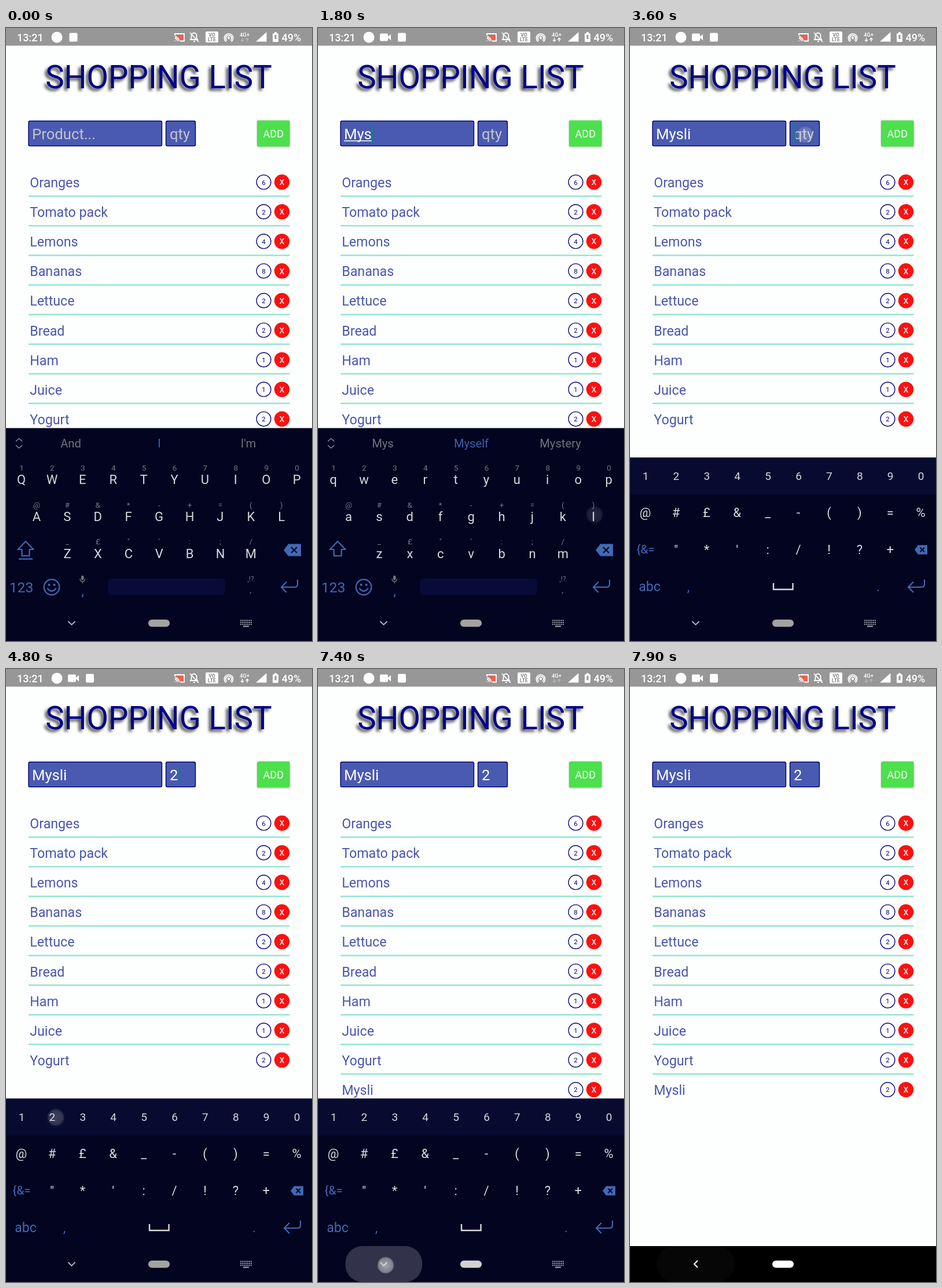
Recreate the animation shown at these times as an HTML page. Size 529x1058 px, loop 8 s.

```html
<!DOCTYPE html>
<html lang="en">
<head>
<meta charset="utf-8">
<title>Shopping list</title>
<style>
  html, body { margin: 0; width: 100%; height: 100%; overflow: hidden; background: #fdfffe; }
  svg { display: block; width: 100%; height: 100%; font-family: Roboto, sans-serif; }
  text { white-space: pre; }
  .mid { text-anchor: middle; }
  .title { font-size: 54.6px; fill: #00008b; filter: drop-shadow(-4px 4px 2.5px rgba(0, 0, 0, .75)); }
  .field { fill: #4a5ab0; stroke: #00007c; stroke-width: 1.4; }
  .input { font-size: 25.7px; }
  .add { fill: #4ce04c; filter: drop-shadow(0 1.5px 1.5px rgba(0, 0, 0, .3)); }
  .item { font-size: 23.2px; fill: #4a55ae; }
  .count { font-size: 11.5px; fill: #00007c; }
  .key { font-size: 22px; fill: #d9d9de; }
  .hint { font-size: 13.5px; fill: #77777f; }
  .blue { fill: #4169b5; }
  .line { fill: none; stroke: #4169b5; stroke-width: 2.2; }
  .status { font-size: 18px; font-weight: 500; fill: #fff; }
</style>
</head>
<body>
<svg id="stage" viewBox="0 0 529 1058"></svg>
<script>
const LOOP = 8000;
const COL = 52.9, ROW = 51.1;
const items = [['Oranges', 6], ['Tomato pack', 2], ['Lemons', 4], ['Bananas', 8], ['Lettuce', 2],
  ['Bread', 2], ['Ham', 1], ['Juice', 1], ['Yogurt', 2], ['Mysli', 2]];

// Timeline, in ms
const typed = [[0, ''], [880, 'M'], [1300, 'My'], [1600, 'Mys'], [1850, 'Mysl'], [2080, 'Mysli'], [2330, 'Mysli ']];
const suggestions = {
  '': ['And', 'I', "I'm"],
  'M': ['Muchas', 'Me', 'Me gustaría'],
  'My': ['Mi', 'My', 'Myself'],
  'Mys': ['Mys', 'Myself', 'Mystery'],
  'Mysl': ['Mysl', 'Myself', 'Mysli'],
  'Mysli': ['Myself', 'Mysli', 'Muslim'],
  'Mysli ': ['de', 'and', 'is']
};
const QTY_FOCUS = 3500, KEYS_SWAP = 3600, QTY_TYPED = 4730, ITEM_ADDED = 6200;
const HIDE_START = 7500, HIDE_END = 7750;
const blinkStarts = [-700, ...typed.slice(1).map(step => step[0]), QTY_FOCUS, QTY_TYPED];
const taps = [
  [850, 1150, 428, 899], [1230, 1450, 293, 777], [1530, 1750, 109, 841], [1780, 1990, 478, 840],
  [2010, 2220, 399, 777], [2270, 2620, 271, 711], [3400, 3650, 303, 184], [4550, 4850, 86, 774],
  [5700, 6100, 459, 182], [7200, 7600, 117, 1029]
];

const label = (x, y, str, cls = '', attrs = '') =>
  `<text x="${x}" y="${y}" class="${cls}" ${attrs}>${str.replace('&', '&amp;')}</text>`;
const rect = (x, y, w, h, fill, r = 0, attrs = '') =>
  `<rect x="${x}" y="${y}" width="${w}" height="${h}" rx="${r}" fill="${fill}" ${attrs}/>`;
const path = (d, attrs = 'class="line"') => `<path d="${d}" ${attrs}/>`;
const whiteLine = 'fill="none" stroke="#fff" stroke-width="1.8"';
const row = (chars, x, y, cls = 'key', attrs = '') =>
  [...chars].map((c, i) => c === ' ' ? '' : label(x + COL * i, y, c, `mid ${cls}`, attrs)).join('');

function statusBar() {
  return rect(0, 0, 529, 30.5, '#979797')
    + label(19, 22.5, '13:21', 'status') + label(476.5, 22.5, '49%', 'status')
    + '<circle cx="88" cy="16" r="9.5" fill="#fff"/>'
    + `<g id="camera">${rect(107, 9.5, 14, 13, '#fff', 2)}${path('M120 16l6-5.5v11z', 'fill="#fff"')}</g>`
    + `<g id="badge">${rect(138, 8.5, 14, 15, '#fff', 2)}</g>`
    + rect(295, 12, 12, 9, '#f0604f')
    + path('M292 13V10h16v12.500h-7M292 22.500v-1M292 18a5 5 0 0 1 4.500 4.500M292 15a8 8 0 0 1 7.500 7.500', whiteLine)
    + path('M319 20h12l-1.500-2.500v-4.500a4.500 4.500 0 0 0-9 0v4.500zM324 23h3M318 8l15 16', whiteLine)
    + rect(345, 6, 22, 19, '#fff', 2)
    + label(356, 14.5, 'VO', 'mid', 'font-size="8.500" font-weight="700" fill="#888"')
    + label(356, 23, 'LTE', 'mid', 'font-size="8.500" font-weight="700" fill="#888"')
    + '<circle cx="385" cy="17" r="2.200" fill="#fff"/>'
    + path('M382 21.500a5 5 0 1 1 6 0M380.500 23.500a7.600 7.600 0 1 1 9 0', whiteLine)
    + label(412.5, 14.5, '4G+', 'mid', 'font-size="9.500" font-weight="500" fill="#fff"')
    + `<g id="traffic">${path('M408.500 17v6m-2.500-2.500l2.500 2.500 2.500-2.500M417 23.500v-6m-2.500 2.500l2.500-2.500 2.500 2.500',
        'fill="none" stroke="#fff" stroke-width="1.500"')}</g>`
    + path('M432 23.500h18.500V7z', 'fill="#fff"')
    + rect(461, 9, 10, 15, '#fff', 1.5) + rect(464, 7, 4, 3, '#fff')
    + rect(464.5, 12, 3, 7, '#979797');
}

function listItem([name, count], i) {
  const y = 266 + ROW * i;
  const separator = i ? rect(39, y - 28.100, 451.5, 2.4, '#8ee4d0') : '';
  return `<g id="item${i}">${separator}${label(41.3, y + 9, name, 'item')}
    <circle cx="445.500" cy="${y}" r="12.400" fill="#fff" stroke="#00007c" stroke-width="1.400"/>
    ${label(445.5, y + 4.5, String(count), 'mid count')}
    <circle cx="477" cy="${y}" r="13.200" fill="#fd1010"/>
    ${label(477, y + 5.2, 'x', 'mid', 'font-size="18" fill="#fff"')}</g>`;
}

function app() {
  return rect(0, 0, 529, 996, '#fdfffe') + statusBar()
    + label(264, 104, 'SHOPPING LIST', 'mid title')
    + '<rect class="field" x="39" y="160.500" width="230.500" height="43" rx="2.500"/>'
    + '<rect class="field" x="276.500" y="160.500" width="51" height="43" rx="2.500"/>'
    + label(45, 192, '', 'input', 'id="product"') + label(283, 192, '', 'input', 'id="qty"')
    + rect(45, 194, 0, 1.5, '#fff', 0, 'id="underline"')
    + rect(0, 166, 2.6, 33, '#0d7f88', 0, 'id="cursor"')
    + '<rect class="add" x="434" y="159.500" width="56.500" height="45" rx="2.500"/>'
    + label(462.3, 189.3, 'ADD', 'mid', 'font-size="18" fill="#fff"')
    + items.map(listItem).join('');
}

function backspace(x, y, w, h) {
  const cx = x + w * .6, cy = y + h / 2, s = h * .23;
  return path(`M${x} ${cy}l${w * .27} ${-h / 2}h${w * .73}v${h}h${-w * .73}z`, 'class="blue"')
    + path(`M${cx - s} ${cy - s}l${2 * s} ${2 * s}m0 ${-2 * s}l${-2 * s} ${2 * s}`,
      'stroke="#020420" stroke-width="2"');
}
const enter = x => path(`M${x + 30} 952v8q0 5-5 5h-23m9-9l-9 9 9 9`);

function letterRows(upper) {
  const fit = s => upper ? s : s.toLowerCase();
  return `<g id="${upper ? 'upper' : 'lower'}">${row(fit('QWERTYUIOP'), 26.5, 787.3)}
    ${row(fit('ASDFGHJKL'), 53, 851.3)}${row(fit('ZXCVBNM'), 106, 915)}
    ${upper ? path('M22 916.500h24') : ''}</g>`;
}

function letterKeys() {
  return '<g id="letters">' + rect(0, 690.5, 529, 368, '#020420')
    + path('M17 713.500l5.500-5 5.500 5M17 720l5.500 5 5.500-5', 'fill="none" stroke="#888a96" stroke-width="1.500"')
    + [112, 265, 419].map((x, i) =>
        label(x, 724, '', 'mid', `id="hint${i}" fill="${i === 1 ? '#3b61ae' : '#70727c'}"`)).join('')
    + row('1234567890', 27, 764, 'hint') + row('@#&*-+=()', 53, 828, 'hint')
    + row('_£"\':;/', 106, 891, 'hint')
    + letterRows(true) + letterRows(false)
    + path('M34 886l13.500 14h-7v11h-13v-11h-7z', 'class="line" stroke-linejoin="round"')
    + backspace(480, 890.5, 30, 21)
    + label(26.5, 974, '123', 'mid blue', 'font-size="24.500"')
    + '<circle class="line" cx="79" cy="965" r="13.300"/>'
    + '<circle class="blue" cx="74.500" cy="961" r="2"/><circle class="blue" cx="83.500" cy="961" r="2"/>'
    + path('M71.500 967q7.500 10 15 0')
    + rect(130, 945, 4.4, 8, '#77777f', 2.2)
    + path('M128 950.500q0 5 4.200 5t4.200-5M132.200 955.500v3', 'fill="none" stroke="#77777f" stroke-width="1.300"')
    + label(132.5, 979.5, ',', 'mid blue', 'font-size="23"')
    + rect(176, 950, 202.5, 29, '#080b38', 6)
    + label(423, 955, ',!?', 'mid hint', 'style="font-size:12px"')
    + label(423, 976, '.', 'mid hint', 'style="font-size:20px"')
    + enter(474) + '</g>';
}

function numberKeys() {
  return '<g id="numbers">' + rect(0, 741.5, 529, 317, '#020420') + rect(0, 741.5, 529, 64, '#080b30')
    + row('1234567890', 27, 779.7, 'key', 'style="font-size:19px"')
    + row('@#£&_-()=%', 26.5, 844) + row('"*\':/!?+', 79.5, 907.5)
    + label(27, 907, '{&=', 'mid blue', 'font-size="21"')
    + backspace(492, 892.5, 22, 16)
    + label(34, 971.5, 'abc', 'mid blue', 'font-size="23"')
    + label(101, 972, ',', 'mid blue', 'font-size="22"')
    + path('M248 958v11h33.500v-11', 'fill="none" stroke="#d9d9de" stroke-width="2.400"')
    + label(429, 971.5, '.', 'mid blue', 'font-size="22"')
    + enter(479) + '</g>';
}

function navigation() {
  const dots = Array.from({ length: 21 }, (_, i) =>
    rect(405 + i % 7 * 3, 1021.5 + Math.floor(i / 7) * 3.4, 1.9, 2, '#a4a4ad')).join('');
  return rect(47.5, 996, 132.5, 62, '#fff', 29, 'id="press"')
    + path('M107.500 1024l6 6 6-6', 'id="hide" fill="none" stroke="#b5b5bd" stroke-width="1.900"')
    + path('M117 1021l-6 6 6 6', 'id="back" fill="none" stroke="#fff" stroke-width="2"')
    + rect(246, 1021, 37, 12.5, '#a2a2a8', 6.25, 'id="pill"')
    + `<g id="dots">${dots}${rect(410, 1031.7, 10, 2, '#a4a4ad')}</g>`;
}

document.getElementById('stage').innerHTML = `<defs><radialGradient id="glow">
    <stop offset="0" stop-color="#fff" stop-opacity=".55"/>
    <stop offset=".65" stop-color="#e4e6ee" stop-opacity=".45"/>
    <stop offset=".78" stop-color="#a0a4b4" stop-opacity=".38"/>
    <stop offset=".82" stop-color="#303038" stop-opacity=".32"/>
    <stop offset="1" stop-color="#303038" stop-opacity="0"/>
  </radialGradient></defs>`
  + app() + rect(0, 996, 529, 62, '#000')
  + `<g id="keyboard">${letterKeys()}${numberKeys()}</g>` + navigation()
  + '<circle id="touch" r="18" fill="url(#glow)"/>';

const el = Object.fromEntries([...document.querySelectorAll('[id]')].map(node => [node.id, node]));
const set = (node, attrs) => { for (const name in attrs) node.setAttribute(name, attrs[name]); };
const show = (node, on) => { node.style.display = on ? '' : 'none'; };
const clamp = v => Math.max(0, Math.min(1, v));
const progress = (t, from, to) => clamp((t - from) / (to - from));

function fill(node, value, placeholder) {
  node.textContent = value || placeholder;
  set(node, { fill: value ? '#fff' : '#c3c4cc' });
}

function render(t) {
  const text = typed.filter(step => step[0] <= t).pop()[1];
  const qty = t >= QTY_TYPED ? '2' : '';
  fill(el.product, text, 'Product...');
  fill(el.qty, qty, 'qty');

  const active = t < QTY_FOCUS ? el.product : el.qty;
  const value = t < QTY_FOCUS ? text : qty;
  const width = value ? active.getComputedTextLength() : 0;
  const blink = blinkStarts.filter(start => start <= t).pop();
  set(el.cursor, { x: Number(active.getAttribute('x')) + width + 1 });
  show(el.cursor, Math.floor((t - blink) / 500) % 2 === 0 && t < HIDE_START);
  const composing = text && !text.endsWith(' ');
  set(el.underline, { width: composing ? width : 0 });

  suggestions[text].forEach((word, i) => {
    const node = el['hint' + i];
    node.textContent = word;
    set(node, { 'font-size': word.length > 9 ? 18 : 20.2 });
  });
  show(el.upper, !text);
  show(el.lower, text);
  show(el.letters, t < KEYS_SWAP);
  show(el.numbers, t >= KEYS_SWAP && t < HIDE_END);
  show(el.item9, t >= ITEM_ADDED);

  const recording = t >= 300;
  show(el.camera, recording);
  set(el.badge, { transform: `translate(${recording ? 0 : -28.5} 0)` });
  set(el.traffic, { opacity: t >= 500 && t < 6100 ? 1 : .3 });

  set(el.keyboard, { transform: `translate(0 ${320 * progress(t, HIDE_START, HIDE_END) ** 1.6})` });
  const hidden = t >= HIDE_END - 50;
  show(el.hide, !hidden);
  show(el.back, hidden);
  show(el.dots, !hidden);
  const grey = 162 + 48 * progress(t, 7200, 7400) + 45 * progress(t, 7500, 7800);
  set(el.pill, { fill: `rgb(${grey},${grey},${grey})` });
  set(el.press, { opacity: .19 * progress(t, 7200, 7350) - .165 * progress(t, 7550, 7850) });

  const tap = taps.find(([start, end]) => t >= start && t < end);
  show(el.touch, tap);
  if (tap) {
    const [start, end, cx, cy] = tap;
    set(el.touch, { cx, cy, opacity: clamp(Math.min((t - start) / 80, (end - t) / 120)) });
  }
}

function tick() {
  render(performance.now() % LOOP);
  requestAnimationFrame(tick);
}
tick();
</script>
</body>
</html>
```
